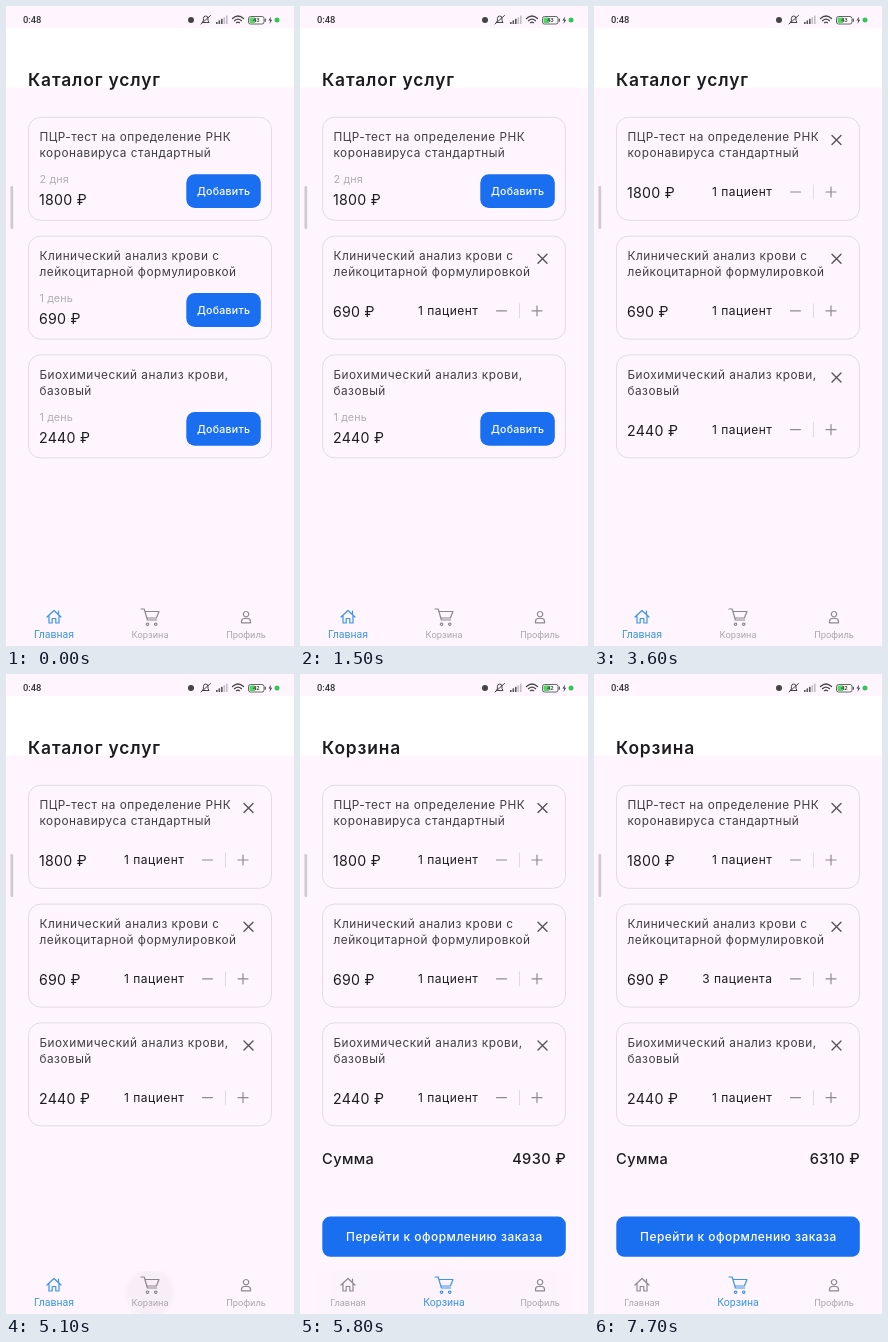
Animation of 288 by 640 pixels, one loop 8000 ms. Source, as an HTML page:

```html
<!DOCTYPE html>
<html lang="ru">
<head>
<meta charset="utf-8">
<title>Каталог услуг</title>
<style>
  html, body { margin: 0; width: 100%; height: 100%; overflow: hidden; background: #fef5ff; }
  svg { display: block; width: 288px; height: 640px; }
  text { font-family: Inter, sans-serif; fill: #1d1b1f; white-space: pre; }
  .title { font-size: 17.4px; font-weight: 600; letter-spacing: .85px; }
  .body { font-size: 11.8px; letter-spacing: .49px; fill: #403d43; }
  .count { font-size: 12px; letter-spacing: .5px; }
  .term { font-size: 10.8px; letter-spacing: .15px; fill: #b3adb6; }
  .price { font-size: 14.2px; letter-spacing: .25px; }
  .sum { font-size: 14.6px; font-weight: 500; letter-spacing: .4px; }
  .add { font-size: 10.6px; font-weight: 500; letter-spacing: .27px; fill: #fff; }
  .order { font-size: 11.9px; font-weight: 500; letter-spacing: .5px; fill: #fff; }
  .clock { font: 500 9.4px Roboto, sans-serif; fill: #333; }
  .charge { font: 500 6px Roboto, sans-serif; fill: #333; }
  .tab text { font: 9.3px Roboto, sans-serif; fill: #aca6af; }
  .tab path { stroke: #8d8890; }
  .tab.on text { font-size: 10.5px; fill: #3a96e8; }
  .tab.on path { stroke: #3a96e8; }
  .end { text-anchor: end; }
  .mid { text-anchor: middle; }
  .blue { fill: #1a6ef0; }
  .line { fill: none; stroke: #8f8a92; stroke-width: 1.2; stroke-linecap: round; stroke-linejoin: round; }
  .status .line { stroke: #444; }
  .ripple { transform-box: fill-box; transform-origin: center; opacity: 0; }
  #tabRipple { animation: tabRipple 8s linear infinite; }
  #plusRipple { animation: plusRipple 8s linear infinite; }
  @keyframes tabRipple {
    0%, 63.7% { opacity: 0; transform: scale(.22); }
    63.75% { opacity: .4; transform: scale(.26); }
    65% { opacity: 1; transform: scale(1); }
    66.5% { opacity: .8; transform: scale(1.2); }
    73.75%, 100% { opacity: 0; transform: scale(1.4); }
  }
  @keyframes plusRipple {
    0%, 82.4% { opacity: 0; transform: scale(.5); }
    82.5% { opacity: .6; transform: scale(.7); }
    83.75% { opacity: 1; transform: scale(1); }
    86.25%, 100% { opacity: 0; transform: scale(1); }
  }
</style>
</head>
<body>
<script>
const LOOP = 8000, CART_AT = 5200, TWO_AT = 6600, THREE_AT = 7100;
let rules = '';

// Shows its content only from one time to another, in ms.
function during(from, to, content) {
  const name = `show-${from}-${to}`;
  const at = (ms, value) => `${ms / LOOP * 100}% { visibility: ${value}; }`;
  rules += `@keyframes ${name} { ${at(0, 'hidden')} ${at(from, 'visible')} ${at(to, to < LOOP ? 'hidden' : 'visible')} }\n`;
  return `<g style="animation: ${name} ${LOOP}ms step-end infinite">${content}</g>`;
}

const text = (x, y, style, value) => `<text x="${x}" y="${y}" class="${style}">${value}</text>`;
const line = (d, style = '') => `<path class="line" d="${d}" style="${style}"/>`;

function card(y, lines, term, price, addedAt, count) {
  const offer = text(33.5, 66, 'term', term) + text(33, 88, 'price', price) +
    '<rect x="180.3" y="57.3" width="74.5" height="33.8" rx="8.5" class="blue"/>' +
    text(217.6, 78, 'add mid', 'Добавить');
  const added = text(33, 81, 'price', price) + count +
    line('M238 18.500l9 9m0-9l-9 9', 'stroke:#57535a;stroke-width:1.4') +
    line('M196.500 75h10M232 75h10m-5-5v10') +
    line('M219.500 68v14', 'stroke:#e0d8e2;stroke-width:1');
  return `<g transform="translate(0 ${y})">
    <rect x="22.5" y=".3" width="243" height="103" rx="12" fill="none" stroke="#e2dae5"/>
    ${lines.map((s, i) => text(33.5, 24 + 16 * i, 'body', s)).join('')}
    ${during(0, addedAt, offer)}${during(addedAt, LOOP, added)}</g>`;
}

const patients = value => text(178.4, 79, 'count end', value);
const changingCount =
  during(1100, TWO_AT, patients('1 пациент')) +
  during(TWO_AT, THREE_AT, patients('2 пациента')) +
  during(THREE_AT, LOOP, patients('3 пациента'));

const icons = {
  home: 'M-7 .5L0-6 7 .5M-5-1V6.500H-1.800V2H1.800V6.500H5V-1M4.500-2V-5.500',
  cart: 'M-9-7.500h3.200l3.200 11h9.200M-5-5h14l-2.600 6.500h-9.500M-2.500 6.500a1.200 1.200 0 1 0 .1 0zM5.700 6.500a1.200 1.200 0 1 0 .1 0z',
  person: 'M0-5a2.700 2.700 0 1 0 .1 0zM-4.500 6.300v-1.300q0-3 3-3h3q3 0 3 3v1.300z'
};
const tab = (x, icon, label, on = '') => `<g class="tab ${on}" transform="translate(${x} 610.5)">
  ${line(icons[icon])}${text(0, 21.2, 'mid', label)}</g>`;

const signalBar = i =>
  `<rect x="${210 + 2.5 * i}" y="${16 - 1.6 * i}" width="1.6" height="${2 + 1.6 * i}" fill="${i < 3 ? '#555' : '#c4bdc7'}"/>`;

const statusBar = `<g class="status">
  ${text(16.9, 17.3, 'clock', '0:48')}
  <circle cx="185" cy="14" r="3" fill="#444"/>
  ${line('M196.500 16.500h6.500l-1-2v-2q0-2.500-2.300-2.500t-2.300 2.500v2zM195 18l9.500-8.500', 'stroke-width:1')}
  ${[0, 1, 2, 3, 4].map(signalBar).join('')}
  ${line('M226.500 12.500q5.500-5 11 0M228.500 14.700q3.500-3 7 0M230.500 16.700q1.500-1 3 0', 'stroke-width:1.3')}
  <rect x="242.5" y="10.5" width="15.5" height="7.5" rx="2" fill="#fff" stroke="#555" stroke-width=".9"/>
  <rect x="243.5" y="11.5" width="5.8" height="5.5" rx="1" fill="#55d568"/>
  <rect x="258.7" y="12.7" width="1.2" height="3" fill="#555"/>
  ${during(0, 4800, text(250.3, 16.4, 'charge mid', '43'))}
  ${during(4800, LOOP, text(250.3, 16.4, 'charge mid', '42'))}
  <path d="M265 10.500l-2.500 4h1.700l-.7 3.500 2.700-4.300h-1.700z" fill="#444"/>
  <circle cx="271" cy="14" r="2.5" fill="#35c65a"/></g>`;

const total = value => text(266.2, 490, 'sum end', value);
const catalog = text(22, 80, 'title', 'Каталог услуг');
const cart = text(22, 80, 'title', 'Корзина') + text(22, 490, 'sum', 'Сумма') +
  '<rect x="22.3" y="542.6" width="243.5" height="40.2" rx="8" class="blue"/>' +
  text(144.4, 567, 'order mid', 'Перейти к оформлению заказа');

const scene = `<svg viewBox="0 0 288 640">
  <defs>
    <radialGradient id="ink">
      <stop offset=".75" stop-opacity=".07"/><stop offset="1" stop-opacity="0"/>
    </radialGradient>
    <clipPath id="bar"><rect y="597" width="288" height="43"/></clipPath>
  </defs>
  <rect width="288" height="640" fill="#fef5ff"/>
  <rect y="22" width="288" height="59.5" fill="#fff"/>
  ${statusBar}
  <rect x="4.5" y="180" width="2.7" height="43" rx="1.3" fill="#d0c8d3"/>
  ${during(0, CART_AT, catalog)}${during(CART_AT, LOOP, cart)}
  ${during(CART_AT, TWO_AT, total('4930 ₽'))}
  ${during(TWO_AT, THREE_AT, total('5620 ₽'))}
  ${during(THREE_AT, LOOP, total('6310 ₽'))}
  <circle id="plusRipple" class="ripple" cx="237" cy="305" r="13.5" fill="#000" fill-opacity=".045"/>
  ${card(111, ['ПЦР-тест на определение РНК', 'коронавируса стандартный'], '2 дня', '1800 ₽', 2000, patients('1 пациент'))}
  ${card(229.8, ['Клинический анализ крови с', 'лейкоцитарной формулировкой'], '1 день', '690 ₽', 1100, changingCount)}
  ${card(348.6, ['Биохимический анализ крови,', 'базовый'], '1 день', '2440 ₽', 3600, patients('1 пациент'))}
  <g clip-path="url(#bar)"><circle id="tabRipple" class="ripple" cx="144" cy="619" r="104" fill="url(#ink)"/></g>
  ${during(0, CART_AT, tab(48, 'home', 'Главная', 'on') + tab(144, 'cart', 'Корзина'))}
  ${during(CART_AT, LOOP, tab(48, 'home', 'Главная') + tab(144, 'cart', 'Корзина', 'on'))}
  ${tab(240, 'person', 'Профиль')}
</svg>`;

document.body.innerHTML = `<style>${rules}</style>${scene}`;
</script>
</body>
</html>
```
